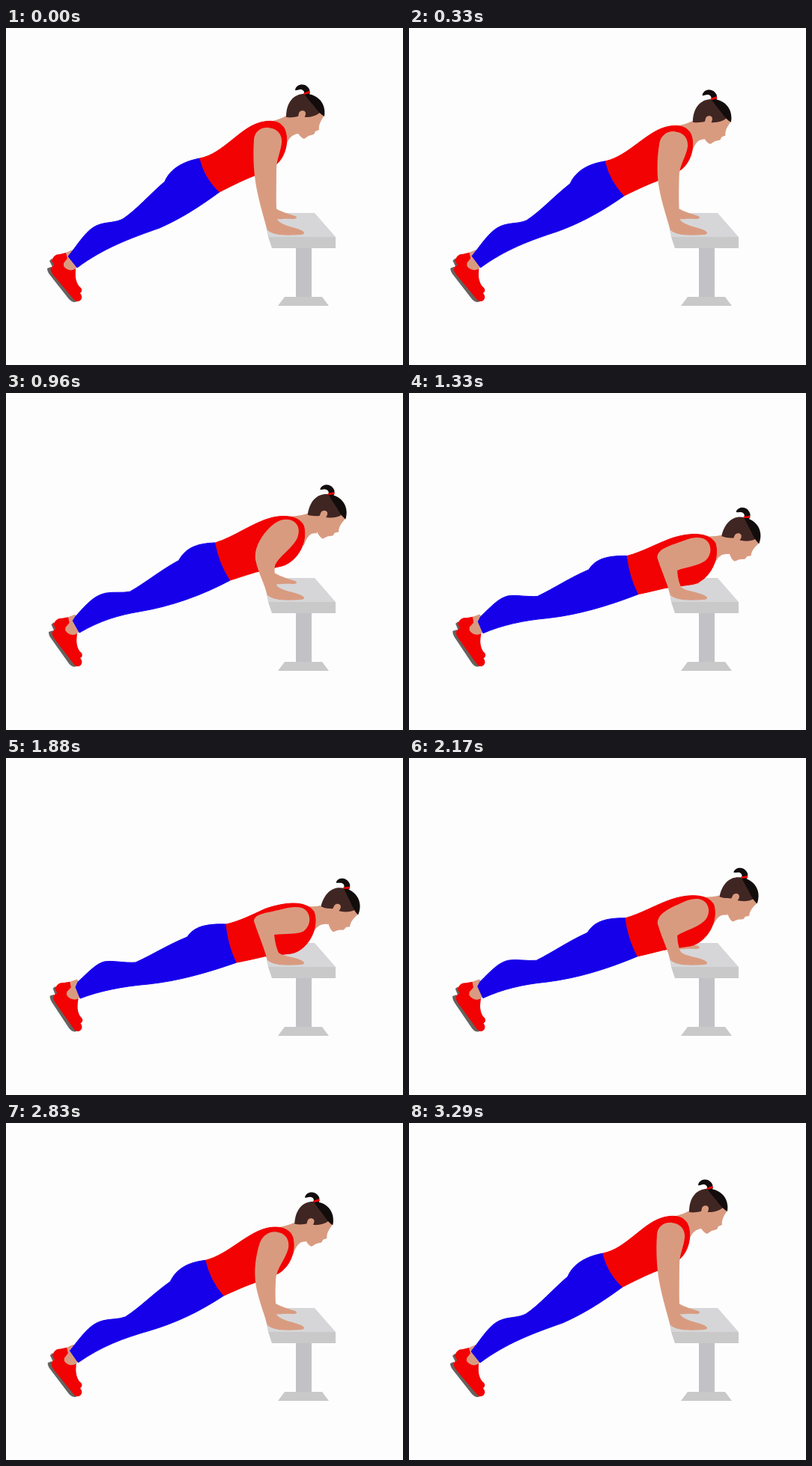
Animation of 530x450 px, one loop 3330 ms. Source, as an HTML page:

```html
<!DOCTYPE html>
<html lang="en">
<head>
<meta charset="utf-8">
<title>Incline push-up</title>
<style>
  html, body { margin: 0; height: 100%; overflow: hidden; background: #fdfdfd; }
  svg { display: block; width: 530px; height: 450px; }
  .skin { fill: #d99b80; }
  .red { fill: #f20202; }
  .blue { fill: #1600ea; }
  .sole { fill: #66625f; }
  .brown { fill: #402622; }
  .dark { fill: #120d0c; }
  #legs { stroke: #1600ea; }
  #torso { stroke: #f20202; }
</style>
</head>
<body>
<svg viewBox="0 0 530 450">
  <g id="bench">
    <path fill="#c2c2c6" d="M387 293H408V360H387Z"/>
    <path fill="#c9c9ca" d="M372 359H422L431 371H363Z"/>
    <path fill="#d6d6d8" d="M344 250L350 247H412L440 279H350Z"/>
    <path fill="#c9c9ca" d="M350 279H440V294H355Z"/>
  </g>
  <path class="skin" d="M358 240C368 246 380 249 386 251C390 253 388 255 382 255C372 254 365 256 358 255Z"/>
  <g id="feet">
    <path class="sole" d="M58 311L61 308L72 320L62 319Z"/>
    <path class="red" d="M61 311C63 305 66 302 72 302L80 300L92 318C92 330 93 342 100 347C103 351 100 355 95 355L66 320Z"/>
    <path class="skin" d="M80 300L89 296L100 308L82 308Z"/>
    <path class="sole" d="M55 321L60 319L95 365C91 367 88 366 84 362L58 329C56 326 55 324 55 321Z"/>
    <path class="red" d="M60 321C61 317 65 317 70 316L77 314L93 320C93 331 91 343 97 352C100 355 102 358 101 361C99 366 95 366 91 363L64 331C61 327 59 324 60 321Z"/>
    <path class="skin" d="M77 314L84 305L96 303L101 316L95 319C91 325 82 325 77 318Z"/>
  </g>
  <path id="legs" class="blue"/>
  <path id="neck" class="skin"/>
  <g id="head">
    <path class="skin" d="M375 114L412 104L425 117C420 124 417 130 418 136L413 138L411 142L404 144L398 148C393 146 391 142 389 139L380 130Z"/>
    <path class="brown" d="M374 119C374 98 385 88 398 88C414 88 425 99 425 116L419 113C414 117 408 119 400 119L390 118C385 119 380 120 374 119Z"/>
    <path class="dark" d="M398 88C416 87 428 101 425 118C421 116 416 111 411 104Q403 95 398 88Z"/>
    <path class="dark" d="M386 83C387 75 398 73 403 79C406 82 406 85 405 89L398 89C399 84 396 82 393 82C390 82 388 84 386 83Z"/>
    <path class="red" d="M397 87L405 84L406 87L398 89Z"/>
    <path class="skin" d="M391 114C392 109 400 109 400 114C400 119 397 120 396 124L389 122Z"/>
  </g>
  <path class="skin" d="M334 209C340 203 349 199 360 197V206Z"/>
  <path id="torso" class="red"/>
  <path id="arm" class="skin"/>
</svg>
<script>
const LOOP = 3330;
const HAND = 'C370 265 383 265 394 270C400 273 399 276 393 276C378 277 358 278 349 270';

// Each part in three poses: arms straight, half way, nearly down
const DEPTHS = [0, .484, .9];
const parts = {
  legs: [
    'M90 296C104 277 112 266 126 262C136 259 146 260 156 255C174 243 192 222 212 205C219 188 237 178 259 174Q265 200 285 219C255 241 232 255 205 267C165 281 130 294 95 320L83 305Z',
    'M93 298C108 281 118 270 133 267C144 265 155 267 165 265C186 253 206 236 230 223C239 207 252 200 279 199Q284 226 299 249C260 270 220 284 180 291C150 296 125 304 98 320L89 304Z',
    'M96 299C111 285 120 275 131 272C142 270 158 274 173 273C197 262 217 249 242 239C250 226 266 221 294 222Q297 251 308 273C265 288 228 298 190 302C155 305 125 311 99 321L93 306Z'
  ],
  neck: [
    'M345 127C358 124 368 121 376 116L394 130L391 141C382 142 378 146 373 158Z',
    'M365 165C380 163 393 163 403 159L420 172L414 186C406 185 402 189 397 202Z',
    'M382 197C396 197 408 200 419 197L437 212L430 222C420 221 416 224 410 233Z'
  ],
  torso: [
    'M259 174C290 168 312 133 340 126C356 122 369 125 373 138C378 155 371 173 362 181L332 197C314 204 299 212 285 219Q265 200 259 174Z',
    'M279 199C305 191 330 171 355 165C372 161 392 163 397 177C402 200 388 222 370 229L333 238C320 242 308 246 299 249Q284 226 279 199Z',
    'M294 222C312 218 327 210 345 202C375 191 401 191 411 205C419 227 403 257 381 261L345 265C332 268 319 271 308 273Q297 251 294 222Z'
  ],
  arm: [
    `M333 205C330 185 330 165 331 150C331 138 341 132 350 133C362 134 369 142 368 153C367 165 361 175 361 190C361 212 360 235 362 256${HAND}C343 250 336 225 333 205Z`,
    `M333 222C331 206 341 189 352 178C360 170 369 166 378 168C389 171 393 181 388 193C381 207 363 218 359 230C358 240 359 249 362 258${HAND}C344 252 336 238 333 222Z`,
    `M331 218C331 207 350 207 372 201C380 199 393 197 400 203C408 210 407 226 396 232C386 236 372 234 358 236C359 243 360 252 364 260${HAND}C344 252 337 236 331 218Z`
  ]
};

// Depth of the push-up over time: [ms, depth]
const keys = [[0, 0], [630, .237], [1330, .82], [1670, 1], [1880, .9],
              [2170, .755], [2460, .484], [2830, .183], [3290, 0], [LOOP, 0]];

// Tangent at a key, flat at turning points
function slope(i) {
  const a = keys[i - 1], b = keys[i], c = keys[i + 1];
  if (!a || !c || (b[1] - a[1]) * (c[1] - b[1]) <= 0) return 0;
  return (c[1] - a[1]) / (c[0] - a[0]);
}

function depthAt(t) {
  const i = keys.findIndex(k => k[0] > t) - 1;
  const [t0, d0] = keys[i], [t1, d1] = keys[i + 1];
  const h = t1 - t0, x = (t - t0) / h, y = 1 - x;
  return d0 * y * y * (1 + 2 * x) + d1 * x * x * (3 - 2 * x)
       + h * x * y * (slope(i) * y - slope(i + 1) * x);
}

// Quadratic blend through the three poses
const weights = d => DEPTHS.map((a, i) =>
  DEPTHS.reduce((w, b, j) => i === j ? w : w * (d - b) / (a - b), 1));
const blend = (w, v) => w[0] * v[0] + w[1] * v[1] + w[2] * v[2];

const shapes = Object.entries(parts).map(([id, poses]) => ({
  node: document.getElementById(id),
  form: poses[0],
  nums: poses.map(p => p.match(/\d+/g).map(Number))
}));
const head = document.getElementById('head');
const feet = document.getElementById('feet');

function draw(now) {
  const d = depthAt(now % LOOP), w = weights(d);
  for (const { node, form, nums } of shapes) {
    let i = 0;
    node.setAttribute('d', form.replace(/\d+/g, () => {
      const value = blend(w, nums.map(n => n[i]));
      i++;
      return value.toFixed(2);
    }));
  }
  const x = blend(w, [397, 421, 436]), y = blend(w, [148, 193, 232]);
  head.setAttribute('transform', `translate(${x} ${y}) rotate(${15 * d}) translate(-397 -148)`);
  feet.setAttribute('transform', `rotate(${5.5 * d} 98 362)`);
}

const start = performance.now();
function tick() {
  draw(performance.now() - start);
  requestAnimationFrame(tick);
}
tick();
</script>
</body>
</html>
```
